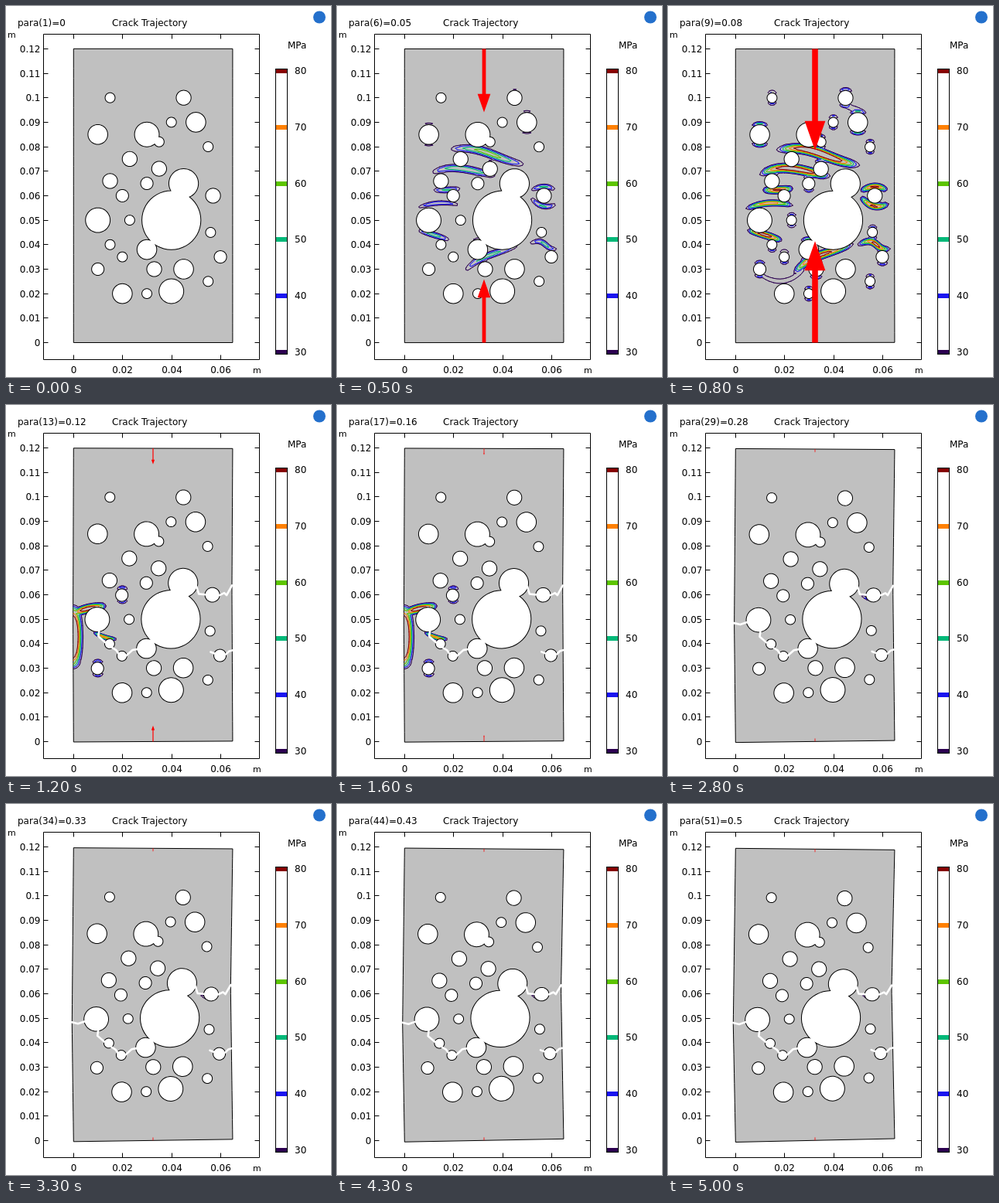
Write an HTML page that moves like this. It is 420 px wide and 480 px high and loops after 5100 ms.

```html
<!DOCTYPE html>
<html lang="en">
<head>
<meta charset="utf-8">
<title>Crack Trajectory</title>
<style>
html, body { margin: 0; width: 100%; height: 100%; overflow: hidden; background: #fff; }
svg { display: block; width: 420px; height: 480px; }
text { font: 12px "DejaVu Sans", sans-serif; fill: #000; }
</style>
</head>
<body>
<svg viewBox="0 0 420 480">
  <defs><clipPath id="clip"><path id="clipEdge"/></clipPath></defs>
  <g id="axes"></g>
  <path id="plate" fill="#c0c0c0" stroke="#000"/>
  <g id="lines" fill="none" stroke-linecap="round" clip-path="url(#clip)"></g>
  <path id="rims" fill="none" stroke="#000" stroke-width="2"/>
  <path id="holes" fill="#fff"/>
  <path id="cracks" fill="none" stroke="#fff" stroke-width="2.6" stroke-linejoin="round" stroke-linecap="round"/>
  <path id="arrows" fill="#f00"/>
  <text id="para" x="15" y="26"></text>
  <text x="137" y="26">Crack Trajectory</text>
  <text x="364" y="55">MPa</text>
  <circle cx="405" cy="14.5" r="8" fill="#2470cc"/>
</svg>
<script>
const $ = id => document.getElementById(id);
const STEPS = 51, STEP_MS = 100, SCALE = 3.168, X0 = 87, Y0 = 435.5;
const LEVELS = [30, 40, 50, 60, 70, 80];
const COLORS = ['#2c0050', '#1a14f0', '#00b878', '#5cc400', '#ff8000', '#860000'];

function add(parent, tag, attrs, text) {
  const el = document.createElementNS('http://www.w3.org/2000/svg', tag);
  for (const key in attrs) el.setAttribute(key, attrs[key]);
  if (text !== undefined) el.textContent = text;
  parent.appendChild(el);
  return el;
}

// Axes and colour bar
(function drawAxes() {
  const g = $('axes');
  let d = 'M48.5 36.5H327.5V457.5H48.5Z';
  for (let i = 0; i <= 12; i++) {
    const y = Math.round(Y0 - i * 10 * SCALE - 0.5) + 0.5;
    d += `M48.5 ${y}h6M327.5 ${y}h-6`;
    add(g, 'text', { x: 44.5, y: y + 4, 'text-anchor': 'end' }, i / 100);
  }
  for (let i = 0; i <= 3; i++) {
    const x = Math.round(X0 + i * 20 * SCALE) + 0.5;
    d += `M${x} 36.5v6M${x} 457.5v-6`;
    add(g, 'text', { x, y: 475, 'text-anchor': 'middle' }, i / 50);
  }
  add(g, 'path', { d, fill: 'none', stroke: '#000' });
  add(g, 'text', { x: 2, y: 41, style: 'font-size:11px' }, 'm');
  add(g, 'text', { x: 319, y: 475, style: 'font-size:11px' }, 'm');
  LEVELS.forEach((level, i) => {
    const y = Math.round(448 - i * 72.8);
    add(g, 'rect', { x: 348, y: y - 3, width: 16, height: 6, fill: COLORS[i] });
    add(g, 'text', { x: 373, y: y + 4 }, level);
  });
  add(g, 'rect', { x: 348.5, y: 81.5, width: 15, height: 369, fill: 'none', stroke: '#000' });
})();

const lines = COLORS.map(stroke => add($('lines'), 'path', { stroke, 'stroke-width': 1 }));

// Holes: x, y, radius in mm
const holes = [
  [15,100,2], [45,100,3], [50,90,4], [40,90,2], [10,85,4], [30,85,5], [35,82,2], [55,80,2],
  [23,75,3], [35,71,3], [15,66,3], [30,65,2.5], [20,60,2.5], [45,65,6], [57,60,3], [40,50,12],
  [10,50,5], [23,50,2], [15,40,2], [20,35,2], [30,38,4], [33,30,3], [10,30,2.5], [45,30,4],
  [20,20,4], [30,20,2], [40,21,5], [56,45,2], [60,35,2.5], [55,25,2]
].map(([x, y, r]) => [X0 + x * SCALE, Y0 - y * SCALE, r * SCALE]);

// Cracks: first step, then points in px
const cracks = [
  [10, 247,234, 250,244, 258,245],
  [10, 277,246, 283,243, 286,246, 293,233],
  [11, 121,292, 120,299, 129,307],
  [11, 138,314, 143,317, 147,323],
  [11, 155,325, 164,317, 170,316],
  [11, 265,320, 270,322],
  [11, 285,323, 289,319, 293,318],
  [28, 87,281, 95,283, 104,280]
];

// Stress bands: width, peak, Bezier control points
const loaded = [
  [6.5, 105, 142,186, 190,178, 200,198, 246,206],
  [6, 95, 120,218, 148,200, 180,216, 208,220],
  [5, 85, 124,238, 142,239, 160,236],
  [4, 80, 102,262, 130,250, 160,258],
  [4.5, 85, 250,239, 268,229, 282,238],
  [4.5, 85, 250,247, 264,266, 284,256],
  [4.5, 90, 104,290, 126,296, 146,303],
  [5.5, 88, 164,345, 182,322, 204,322, 238,308],
  [4.5, 88, 246,309, 272,295, 266,318, 286,314],
  [7, 36, 122,349, 150,366, 174,342],
  [7, 38, 230,130, 240,132, 254,138]
];
const bending = [
  [11, 110, 86,338, 88,300, 86,262],
  [5.5, 92, 87,270, 104,262, 128,260],
  [3, 78, 114,294, 126,302, 142,303]
];
const hinge = [[9, 108, 85,328, 88,290, 85,250]];
const residue = [[2.5, 54, 250,246, 260,254, 271,252]];

// Stress lobes above and below a hole
const lobes = ([x, y, r]) => [-1, 1].map(s => {
  const foot = y + s * r * 0.95;
  return [3.5, 31 + 1.9 * r, x - 0.7 * r, foot, x, y + s * (r + 3), x + 0.7 * r, foot];
});
for (const hole of holes) {
  const r = hole[2], low = hole[1] > 335;
  if (r < 14 && !(r > 12 && low)) loaded.push(...lobes(hole));
}
bending.push(...lobes(holes[12]), ...lobes(holes[22]));

const clamp = (v, a = 0, b = 1) => Math.min(b, Math.max(a, v));
const ramp = (k, a, b) => clamp((k - a) / (b - a));

function bezier(p, t) {
  let q = p;
  while (q.length > 2) q = q.slice(2).map((v, i) => q[i] + (v - q[i]) * t);
  return q;
}

// Scalar stress field sampled on a regular grid
const CELL = 2, GX = 85, GY = 100, NX = 107, NY = 148, PARTS = 12;

function addSegment(field, w, [ax, ay, av], [bx, by, bv]) {
  const dx = bx - ax, dy = by - ay, len2 = dx * dx + dy * dy, pad = 3 * w;
  const i0 = Math.max(0, Math.floor((Math.min(ax, bx) - pad - GX) / CELL));
  const i1 = Math.min(NX - 1, Math.ceil((Math.max(ax, bx) + pad - GX) / CELL));
  const j0 = Math.max(0, Math.floor((Math.min(ay, by) - pad - GY) / CELL));
  const j1 = Math.min(NY - 1, Math.ceil((Math.max(ay, by) + pad - GY) / CELL));
  for (let j = j0; j <= j1; j++) for (let i = i0; i <= i1; i++) {
    const x = GX + i * CELL, y = GY + j * CELL;
    const u = clamp(((x - ax) * dx + (y - ay) * dy) / len2);
    const d2 = (x - ax - u * dx) ** 2 + (y - ay - u * dy) ** 2;
    const v = (av + (bv - av) * u) * Math.exp(-d2 / (w * w));
    const at = j * NX + i;
    field[at] = Math.max(field[at], v);
  }
}

function addBands(field, bands, gain) {
  if (gain <= 0) return;
  for (const [w, peak, ...p] of bands) {
    let last;
    for (let i = 0; i <= PARTS; i++) {
      const t = i / PARTS, bell = clamp(Math.sin(Math.PI * t)) ** 0.6;
      const next = [...bezier(p, t), gain * (32 + (peak - 32) * bell)];
      if (last) addSegment(field, w, last, next);
      last = next;
    }
  }
}

// Marching squares
function contour(field, level) {
  let d = '';
  for (let j = 0; j < NY - 1; j++) for (let i = 0; i < NX - 1; i++) {
    const at = j * NX + i;
    const a = field[at], b = field[at + 1], c = field[at + NX + 1], e = field[at + NX];
    if (Math.max(a, b, c, e) < level || Math.min(a, b, c, e) >= level) continue;
    const pts = [];
    const cross = (p, q, x, y, ux, uy) => {
      if ((p < level) === (q < level)) return;
      const t = (level - p) / (q - p);
      pts.push((GX + (i + x + ux * t) * CELL).toFixed(1) + ' ' + (GY + (j + y + uy * t) * CELL).toFixed(1));
    };
    cross(a, b, 0, 0, 1, 0);
    cross(b, c, 1, 0, 0, 1);
    cross(e, c, 0, 1, 1, 0);
    cross(a, e, 0, 0, 0, 1);
    for (let n = 0; n + 1 < pts.length; n += 2) d += `M${pts[n]}L${pts[n + 1]}`;
  }
  return d;
}

const cache = [];
function contours(k) {
  if (!cache[k]) {
    const field = new Float32Array(NX * NY);
    addBands(field, loaded, k < 10 ? k / 8 : k === 10 ? 0.6 : 0);
    if (k >= 10 && k < 28) {
      addBands(field, bending, 1 - 0.8 * ramp(k, 16, 22));
      addBands(field, hinge, 0.4 + 0.6 * ramp(k, 16, 22));
    }
    if (k >= 18) addBands(field, residue, 1 - 0.25 * ramp(k, 23, 33));
    cache[k] = LEVELS.map(level => contour(field, level));
  }
  return cache[k];
}

// The two halves tilt towards each other about the broken ligament
function warp(x, y, amt) {
  const u = (x - X0) / (65 * SCALE), h = (Y0 - y) / SCALE;
  const mid = 48 + 14 * u;
  const dx = -(3 + u) * (h < mid ? h / mid : (120 - h) / (120 - mid));
  const s = ramp(h, mid - 8, mid + 8);
  const dy = s * (2 + 2 * u) + (1 - s) * (2 - 4.5 * u);
  return [x + amt * dx, y + amt * dy];
}
const poly = pts => 'M' + pts.map(p => p[0].toFixed(2) + ' ' + p[1].toFixed(2)).join('L');

function platePath(amt) {
  const right = X0 + 65 * SCALE, left = [], side = [];
  for (let h = 0; h <= 120; h += 4) {
    left.push(warp(X0 + 0.3, Y0 - h * SCALE, amt));
    side.unshift(warp(right, Y0 - h * SCALE, amt));
  }
  return poly(left.concat(side)) + 'Z';
}

function holePath(amt) {
  return holes.map(([x, y, r]) => {
    const pts = [];
    for (let i = 0; i < 48; i++) {
      const a = i * Math.PI / 24;
      pts.push(warp(x + (r - 0.4) * Math.cos(a), y + (r - 0.4) * Math.sin(a), amt));
    }
    return poly(pts) + 'Z';
  }).join('');
}

function crackPath(k, amt) {
  let d = '';
  for (const [from, ...p] of cracks) {
    if (k < from) continue;
    const pts = [];
    for (let i = 0; i < p.length; i += 2) pts.push(warp(p[i], p[i + 1], amt));
    d += poly(pts);
  }
  return d;
}

function arrow(base, dir, len) {
  if (!len) return '';
  const x = 190, s = Math.max(0.4, 0.029 * len), w = 0.102 * len;
  const neck = base + dir * 0.71 * len, tip = base + dir * len;
  return poly([[x - s, base], [x - s, neck], [x - w, neck], [x, tip], [x + w, neck], [x + s, neck], [x + s, base]]) + 'Z';
}

function arrowLength(k) {
  if (k < 10) return 16.4 * k;
  if (k < 28) return 8 - 2 * ramp(k, 16, 23) + 140 * Math.exp(-0.8 * (k - 9));
  return 4.5;
}

let shown = -1;
function draw(time) {
  const k = Math.floor(time / STEP_MS) % STEPS;
  if (k === shown) return;
  shown = k;
  const amt = k < 10 ? k / 100 : k / 50;
  const edge = platePath(amt), rims = holePath(amt), len = arrowLength(k);
  $('plate').setAttribute('d', edge);
  $('clipEdge').setAttribute('d', edge);
  $('rims').setAttribute('d', rims);
  $('holes').setAttribute('d', rims);
  $('cracks').setAttribute('d', crackPath(k, amt));
  contours(k).forEach((d, i) => lines[i].setAttribute('d', d));
  $('arrows').setAttribute('d',
    arrow(warp(190, 55.3, amt)[1], 1, len) + arrow(warp(190, Y0, amt)[1], -1, len));
  $('para').textContent = `para(${k + 1})=${k / 100}`;
}
function tick() {
  draw(performance.now());
  requestAnimationFrame(tick);
}
tick();
</script>
</body>
</html>
```
